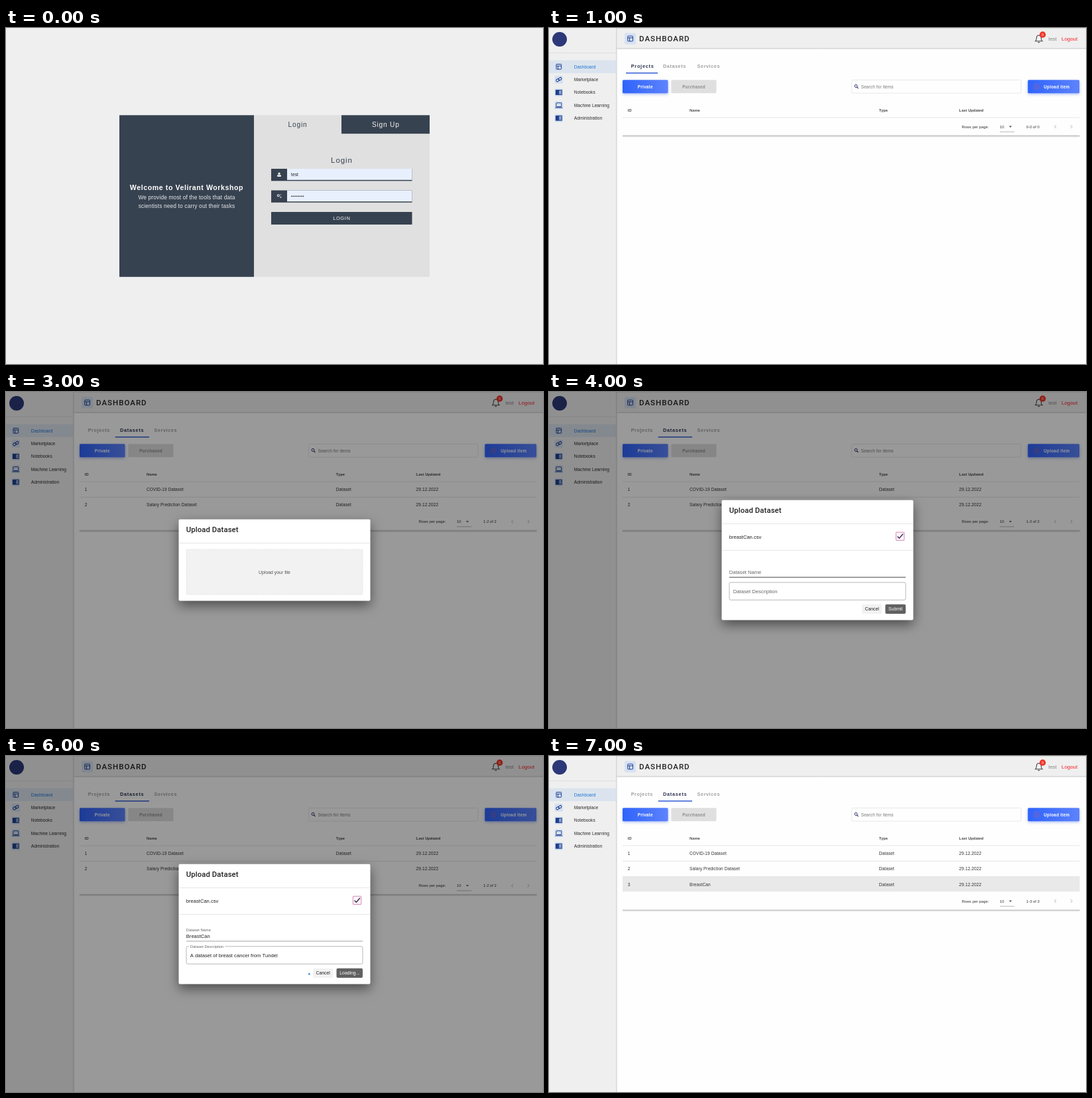
Write an HTML page with a canvas that moves like this. It is 810x506 px and loops after 8000 ms.

```html
<!DOCTYPE html>
<html lang="en">
<head>
<meta charset="utf-8">
<title>Dataset upload walkthrough</title>
<style>
html, body { margin: 0; width: 100%; height: 100%; overflow: hidden; background: #efefef; }
canvas { display: block; width: 810px; height: 506px; }
</style>
</head>
<body>
<canvas id="stage"></canvas>
<script>
const W = 810, H = 506, STEP = 1000;
const SANS = '"Liberation Sans", Arial, sans-serif';
const ROBOTO = 'Roboto, sans-serif';
const SLATE = '#374250', NAVY = '#1f408c', USER = 'test';

const canvas = document.getElementById('stage');
const ctx = canvas.getContext('2d');
const ratio = window.devicePixelRatio || 1;
canvas.width = W * ratio;
canvas.height = H * ratio;
ctx.scale(ratio, ratio);

// ---- helpers ----
function rect(x, y, w, h, fill) {
  ctx.fillStyle = fill;
  ctx.fillRect(x, y, w, h);
}

function box(x, y, w, h, r, fill, stroke, lw = 0.8) {
  ctx.beginPath();
  ctx.roundRect(x, y, w, h, r);
  if (fill) { ctx.fillStyle = fill; ctx.fill(); }
  if (stroke) { ctx.strokeStyle = stroke; ctx.lineWidth = lw; ctx.stroke(); }
}

function disc(x, y, r, fill) {
  ctx.beginPath();
  ctx.arc(x, y, r, 0, Math.PI * 2);
  ctx.fillStyle = fill;
  ctx.fill();
}

function ring(x, y, r, color, lw) {
  ctx.beginPath();
  ctx.arc(x, y, r, 0, Math.PI * 2);
  ctx.strokeStyle = color;
  ctx.lineWidth = lw;
  ctx.stroke();
}

function line(color, lw, ...pts) {
  ctx.beginPath();
  for (let i = 0; i < pts.length; i += 2) ctx.lineTo(pts[i], pts[i + 1]);
  ctx.strokeStyle = color;
  ctx.lineWidth = lw;
  ctx.stroke();
}

// y is the middle of the capitals
function text(s, x, y, size, color, { align = 'left', weight = 400, gap = 0, font = SANS } = {}) {
  ctx.font = `${weight} ${size}px ${font}`;
  ctx.letterSpacing = gap + 'px';
  ctx.textAlign = align;
  ctx.fillStyle = color;
  ctx.fillText(s, x, y + size * 0.36);
}

function withShadow(color, blur, dy, draw) {
  ctx.save();
  ctx.shadowColor = color;
  ctx.shadowBlur = blur * ratio;
  ctx.shadowOffsetY = dy * ratio;
  draw();
  ctx.restore();
}

function fade(x0, y0, x1, y1, a, b) {
  const g = ctx.createLinearGradient(x0, y0, x1, y1);
  g.addColorStop(0, a);
  g.addColorStop(1, b);
  return g;
}

// ---- login ----
function field(y) {
  rect(400, y, 212.5, 18.3, SLATE);
  rect(424, y, 188.5, 16.8, '#e8f0fe');
}

function login() {
  const mid = { align: 'center' };
  rect(0, 0, W, H, '#efefef');
  rect(171, 131.3, 203, 243.5, SLATE);
  rect(374, 131.3, 265, 243.5, '#e0e0e0');
  rect(506, 131.3, 133, 27.9, SLATE);

  text('Welcome to Velirant Workshop', 272.5, 240, 10.6, '#fff', { ...mid, weight: 700, gap: 0.58 });
  text('We provide most of the tools that data', 272.5, 254.7, 8.4, '#e6e8ea', { ...mid, gap: 0.14 });
  text('scientists need to carry out their tasks', 272.5, 267.7, 8.4, '#e6e8ea', { ...mid, gap: 0.14 });
  text('Login', 440, 145.7, 10.2, SLATE, { ...mid, gap: 0.8 });
  text('Sign Up', 572.8, 145.7, 10.2, '#f2f2f2', { ...mid, gap: 0.8 });
  text('Login', 506.4, 199.3, 11.5, SLATE, { ...mid, gap: 0.9 });

  field(212);
  disc(412, 219.3, 1.7, '#e8e8e8');
  box(409, 221.2, 6, 2.7, 1.2, '#e8e8e8');
  text(USER, 430, 221, 6.8, '#222');

  field(244.5);
  ring(410.8, 252.3, 1.5, '#e8e8e8', 1.1);
  ring(414.4, 254.8, 0.8, '#e8e8e8', 0.8);
  ring(414.4, 251, 0.6, '#bbb', 0.6);
  for (let i = 0; i < 8; i++) disc(431 + i * 2.5, 253.3, 0.9, '#333');

  rect(400, 277, 212.5, 19, SLATE);
  text('LOGIN', 506.3, 286.5, 7.5, '#f4f4f4', { ...mid, gap: 0.55 });
}

// ---- dashboard ----
function gridIcon(x, y, s) {
  box(x - s, y - s, s * 2, s * 2, 0.8, null, NAVY, 1);
  line(NAVY, 1, x - s, y - s * 0.3, x + s, y - s * 0.3);
  line(NAVY, 1, x - s * 0.3, y - s * 0.3, x - s * 0.3, y + s);
}

function linkIcon(x, y) {
  ctx.save();
  ctx.translate(x, y);
  ctx.rotate(-0.6);
  box(-4.5, -2, 5, 3.6, 1.8, null, NAVY, 1);
  box(-0.5, -1.6, 5, 3.6, 1.8, null, NAVY, 1);
  ctx.restore();
}

function bookIcon(x, y) {
  box(x - 5, y - 4, 10, 8, 0.8, NAVY);
  rect(x + 0.6, y - 2.8, 3.2, 5.6, '#c9d6ee');
  for (const dy of [-1.3, 0.2, 1.7]) line(NAVY, 0.6, x + 1, y + dy, x + 3.6, y + dy);
}

function laptopIcon(x, y) {
  box(x - 4, y - 3.6, 8, 5.8, 0.6, null, NAVY, 1);
  line(NAVY, 1.1, x - 5.6, y + 3.6, x + 5.6, y + 3.6);
}

function sidebar() {
  rect(0, 0, 101, H, '#efefef');
  rect(101, 0, 3.5, H, fade(101, 0, 104.5, 0, '#c6c6c6', 'rgba(255,255,255,0)'));
  disc(16, 17, 11, '#2c3878');
  rect(0, 37, 101, 1, '#dedede');
  rect(0, 48.5, 101, 19.5, '#dbe4ee');
  const items = [
    ['Dashboard', (x, y) => gridIcon(x, y, 3.8)],
    ['Marketplace', linkIcon],
    ['Notebooks', bookIcon],
    ['Machine Learning', laptopIcon],
    ['Administration', bookIcon],
  ];
  items.forEach(([label, icon], i) => {
    const y = 58.3 + i * 19.35;
    box(8.5, y - 6, 12.5, 12, 1.5, '#d5e0f1');
    icon(14.8, y);
    text(label, 37.8, y, 6.7, i ? '#2b2b2b' : '#2278d0');
  });
}

function header() {
  rect(101, 0, W - 101, 30.5, '#efefef');
  rect(101, 30.5, W - 101, 2.5, fade(0, 30.5, 0, 33, '#b9b9b9', 'rgba(255,255,255,0)'));
  rect(101, 0, W - 101, 0.8, '#dcdcdc');
  box(114, 7.5, 17, 17, 2, '#d6e1f2');
  gridIcon(122.6, 16, 3.9);
  text('DASHBOARD', 136, 16, 11.5, '#222', { weight: 500, gap: 1, font: ROBOTO });

  ctx.beginPath();
  ctx.moveTo(733.8, 19.8);
  ctx.quadraticCurveTo(735.3, 18.6, 735.3, 15);
  ctx.quadraticCurveTo(735.5, 11.2, 738.8, 11);
  ctx.quadraticCurveTo(742.2, 11.2, 742.4, 15);
  ctx.quadraticCurveTo(742.4, 18.6, 743.9, 19.8);
  ctx.closePath();
  ctx.strokeStyle = '#444';
  ctx.lineWidth = 1.1;
  ctx.stroke();
  line('#444', 1.2, 737.4, 21.6, 740.2, 21.6);
  disc(744.6, 10, 4.7, '#f03328');
  text('0', 744.6, 10, 5.5, '#fff', { align: 'center' });
  text(USER, 753.2, 16.3, 8, '#888');
  text('Logout', 773, 16.3, 7.9, '#f5222d');
}

function tabs(active, hover) {
  const list = [['Projects', 123.7, 116, 48], ['Datasets', 172, 164.7, 51.3], ['Services', 223.6, 216, 50]];
  list.forEach(([label, x, left, w], i) => {
    const on = i === active;
    if (on && hover) rect(left, 45.3, w, 23, '#dfe0e6');
    if (on) rect(left, 67, w, 1.6, '#3f67d8');
    text(label, x, 57.3, 7.3, on ? '#2c3350' : '#a0a0a5', { weight: 700, gap: on ? 0.75 : 0.55 });
  });
}

function blueButton(x, w) {
  withShadow('rgba(50,90,220,.4)', 4, 1.5, () =>
    box(x, 78.3, w, 19.9, 1.5, fade(x, 0, x + w, 0, '#2f63fb', '#5d83fc')));
}

function toolbar() {
  const label = { align: 'center', weight: 700, gap: 0.28 };
  blueButton(111, 68.5);
  text('Private', 145.2, 88.4, 6.3, '#fff', label);
  box(184.3, 78.3, 68.2, 19.9, 1.5, '#dfdfdf');
  text('Purchased', 218.5, 88.4, 6.3, '#8b8b8b', label);

  box(456.5, 78.3, 255.5, 19.9, 1.5, null, '#e4e4e4');
  ring(463, 87.4, 2, '#2d3566', 1);
  line('#2d3566', 1.1, 464.5, 89, 466.5, 91);
  text('Search for items', 470.7, 88.4, 6.5, '#777', { gap: 0.1 });

  blueButton(722.3, 77.8);
  ring(735, 88.3, 3.9, '#8a62b4', 1);
  line('#8a62b4', 0.9, 733, 88.3, 737, 88.3);
  line('#8a62b4', 0.9, 735, 86.3, 735, 90.3);
  text('Upload item', 765.8, 88.4, 6.3, '#fff', label);
}

function table(names, range, hoverRow) {
  const cols = [118.8, 212, 497.8, 618.6];
  const rowH = 23.3, top = 135;
  ['ID', 'Name', 'Type', 'Last Updated'].forEach((s, i) =>
    text(s, cols[i], 123.5, 5.8, '#4a4a4a', { weight: 700 }));
  rect(111, top - 0.4, 689.5, 0.8, '#e0e0e0');

  names.forEach((name, i) => {
    const y = top + rowH * i;
    if (i === hoverRow) rect(111, y, 689.5, rowH - 0.6, '#e9e9e9');
    [String(i + 1), name, 'Dataset', '29.12.2022'].forEach((s, c) =>
      text(s, cols[c], y + 11.7, 6.5, '#333', { gap: 0.1 }));
    if (i < names.length - 1) rect(111, y + rowH - 0.4, 689.5, 0.8, '#e0e0e0');
  });

  const y = top + rowH * names.length + 13.6;
  text('Rows per page:', 622.4, y, 5.85, '#333');
  text('10', 680, y, 5.85, '#333');
  ctx.beginPath();
  ctx.moveTo(693.8, y - 1);
  ctx.lineTo(698.2, y - 1);
  ctx.lineTo(696, y + 1.4);
  ctx.fillStyle = '#555';
  ctx.fill();
  rect(680, y + 7.3, 22, 0.8, '#aaa');
  text(range, 720, y, 5.85, '#333');
  line('#aaa', 0.9, 765, y - 2.5, 762.5, y, 765, y + 2.5);
  line('#aaa', 0.9, 786.7, y - 2.5, 789.2, y, 786.7, y + 2.5);
  withShadow('rgba(0,0,0,.25)', 2, 0.5, () => rect(111, y + 13.2, 689.5, 1.1, '#bdbdbd'));
}

const saved = ['COVID-19 Dataset', 'Salary Prediction Dataset'];

function dashboard({ tab = 1, hover = false, names = saved, range = '1-2 of 2', hoverRow = -1 } = {}) {
  rect(0, 0, W, H, '#fefefe');
  tabs(tab, hover);
  toolbar();
  table(names, range, hoverRow);
  header();
  sidebar();
}

// ---- dialog ----
function dialog(top, bottom) {
  dashboard();
  rect(0, 0, W, H, 'rgba(0,0,0,.4)');
  withShadow('rgba(0,0,0,.5)', 18, 7, () => box(260.5, top, 289, bottom - top, 2, '#fff'));
  text('Upload Dataset', 271.8, top + 15.7, 11.3, '#222', { weight: 500, gap: 0.1, font: ROBOTO });
  rect(260.5, top + 35.3, 289, 0.8, '#e0e0e0');
}

function pickFile() {
  dialog(191.7, 314.5);
  ctx.setLineDash([2, 1.5]);
  box(272, 237, 266, 68, 1.5, '#f2f2f2', '#dcdcdc');
  ctx.setLineDash([]);
  text('Upload your file', 405, 271.3, 6.9, '#555', { align: 'center' });
}

function button(x, w, label, fill, color) {
  box(x, 319.8, w, 14.2, 2, fill);
  text(label, x + w / 2, 327, 6.8, color, { align: 'center' });
}

function form({ filled = false, loading = false } = {}) {
  dialog(162.7, 343.5);
  text('breastCan.csv', 271.8, 218.5, 7.6, '#222');
  box(523.4, 211.2, 12.4, 12.2, 0.5, '#fdf6fa', '#d487b4', 1);
  line('#3b3157', 1.5, 525.6, 217.4, 528.3, 220.2, 534, 213.8);
  rect(260.5, 238, 289, 0.8, '#e0e0e0');

  rect(272, 278.5, 266, filled ? 0.8 : 1.1, filled ? '#8c8c8c' : '#555');
  box(272, 286.8, 266, 26.4, 2, null, '#b0b0b0', 0.9);
  if (filled) {
    text('Dataset Name', 271.8, 261.8, 5.8, '#666');
    text('BreastCan', 271.8, 271.5, 7.6, '#222');
    rect(276, 285, 54, 4, '#fff');
    text('Dataset Description', 278, 287.4, 5.75, '#666');
    text('A dataset of breast cancer from Tundel', 277.8, 300.4, 7.65, '#222');
  } else {
    text('Dataset Name', 271.8, 271.5, 7.6, '#666');
    text('Dataset Description', 277.8, 300.4, 7.65, '#666');
  }

  button(loading ? 463 : 472, 30.3, 'Cancel', '#f2f2f2', '#222');
  if (loading) {
    disc(457.4, 328.2, 1.3, '#2b86dc');
    button(498.5, 39.5, 'Loading...', '#616161', '#fff');
  } else {
    button(507.3, 30.7, 'Submit', '#616161', '#fff');
  }
}

// ---- timeline ----
const scenes = [
  login,
  () => dashboard({ tab: 0, names: [], range: '0-0 of 0' }),
  () => dashboard({ hover: true }),
  pickFile,
  () => form(),
  () => form({ filled: true }),
  () => form({ filled: true, loading: true }),
  () => dashboard({ names: [...saved, 'BreastCan'], range: '1-3 of 3', hoverRow: 2 }),
];

const start = performance.now();
function tick() {
  const t = performance.now() - start;
  scenes[Math.floor(t / STEP) % scenes.length]();
  requestAnimationFrame(tick);
}
tick();
</script>
</body>
</html>
```
